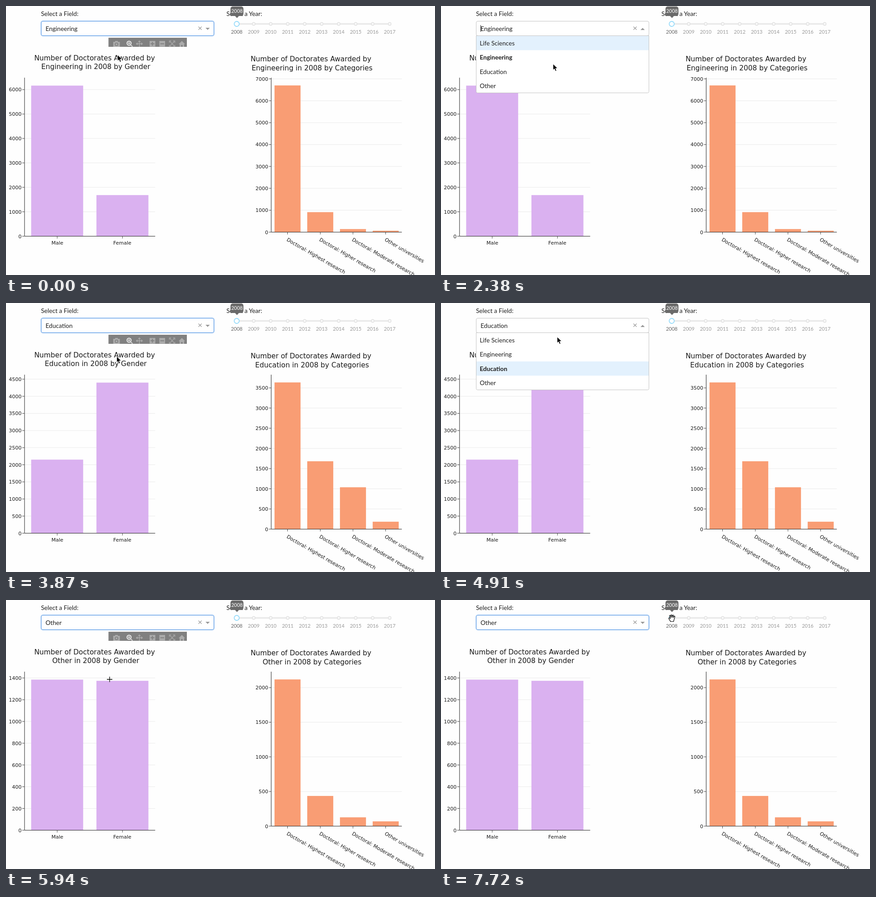
Animation of 944x593 px, one loop 8000 ms. Source, as an HTML page:

```html
<!DOCTYPE html>
<html lang="en">
<head>
<meta charset="utf-8">
<title>Doctorates dashboard</title>
<style>
  html, body { margin: 0; width: 100%; height: 100%; overflow: hidden; background: #fefefe; }
  svg { display: block; width: 944px; height: 593px; }
  text { font-family: Lato, sans-serif; font-size: 13.6px; fill: #1f1f1f; white-space: pre; }
  .plot text { font-family: "DejaVu Sans", Verdana, sans-serif; font-size: 11px; fill: #1a1a1a; }
  .plot .title { font-size: 15.35px; }
</style>
</head>
<body>
<svg id="stage" viewBox="0 0 944 593"></svg>
<script>
const LOOP = 8000, STEP = 148.5;
const stage = document.getElementById('stage');

const fields = ['Life Sciences', 'Engineering', 'Education', 'Other'];
const data = {
  Engineering: { gender: [6163, 1683], genderTick: 1000, types: [6700, 913, 140, 64], typesTick: 1000 },
  Education: { gender: [2150, 4400], genderTick: 500, types: [3635, 1682, 1037, 184], typesTick: 500 },
  Other: { gender: [1385, 1374], genderTick: 200, types: [2118, 436, 127, 69], typesTick: 500 }
};
const typeNames = ['Doctoral: Highest research', 'Doctoral: Higher research',
  'Doctoral: Moderate research', 'Other universities'];

// Pointer path: [step, x, y]
const path = [
  [0, 246, 109], [3, 246, 109], [4, 247, 104], [6, 254, 80], [7, 260, 64], [9, 266, 52],
  [14, 266, 52], [15, 262, 82], [16, 247, 129], [17, 244, 142], [18, 242, 144],
  [23, 242, 144], [24, 242, 138], [26, 244, 119], [28, 250, 88], [29, 254, 64], [31, 260, 47],
  [32, 260, 50], [33, 256, 76], [35, 250, 112], [37, 234, 160], [38, 228, 175],
  [43, 228, 175], [44, 237, 166], [46, 320, 118], [48, 470, 40], [49, 530, 6],
  [50, 538, 30], [51, 518, 40], [52, 508, 40]
];

function pointerAt(k) {
  const i = path.findIndex(p => p[0] >= k);
  if (i <= 0) return i ? path[path.length - 1].slice(1) : path[0].slice(1);
  const [a, b] = [path[i - 1], path[i]];
  const u = (k - a[0]) / (b[0] - a[0]);
  return [a[1] + (b[1] - a[1]) * u, a[2] + (b[2] - a[2]) * u];
}

const rect = (x, y, w, h, fill, more = '') =>
  `<rect x="${x}" y="${y}" width="${w}" height="${h}" fill="${fill}" ${more}/>`;
const draw = (d, stroke, width = 1, fill = 'none', more = '') =>
  `<path d="${d}" stroke="${stroke}" stroke-width="${width}" fill="${fill}" ${more}/>`;
const text = (x, y, s, more = '') => `<text x="${x}" y="${y}" ${more}>${s}</text>`;
const middle = 'text-anchor="middle"';

function barChart({ x, base, values, tick, pitch, barWidth, color, top, title, titleX, titleY }) {
  const scale = top / Math.max(...values);
  const right = x + 287.5;
  let grid = '', labels = '', bars = '';
  for (let v = 0; v * scale <= top / 0.95; v += tick) {
    const y = base - v * scale;
    if (v) grid += draw(`M${x} ${y}H${right}`, '#eaeaea');
    labels += draw(`M${x - 5} ${y}h5`, '#444') + text(x - 6.5, y + 4, v, 'text-anchor="end"');
  }
  values.forEach((v, i) => {
    const center = x + pitch * (i + 0.5);
    bars += rect(center - barWidth / 2, base - v * scale, barWidth, v * scale, color);
    labels += draw(`M${center} ${base}v5`, '#444');
  });
  const heading = title.map((s, i) =>
    text(titleX + (i ? 2.5 : 0), titleY + i * 19.6, s, `class="title" ${middle}`)).join('');
  return grid + bars + draw(`M${x} 158V${base}H${right}`, '#222') + labels + heading;
}

function genderChart(field) {
  const d = data[field];
  return barChart({
    x: 40.8, base: 507.5, values: d.gender, tick: d.genderTick, pitch: 143.6, barWidth: 114.4,
    color: '#dab1f0', top: 332, titleX: 195, titleY: 119.5,
    title: ['Number of Doctorates Awarded by', `${field} in 2008 by Gender`]
  }) + text(113, 526, 'Male', middle) + text(256, 526, 'Female', middle);
}

function typesChart(field) {
  const d = data[field];
  return barChart({
    x: 583.5, base: 498.5, values: d.types, tick: d.typesTick, pitch: 72, barWidth: 57.3,
    color: '#f99d74', top: 323.4, titleX: 671, titleY: 122,
    title: ['Number of Doctorates Awarded by', `${field} in 2008 by Categories`]
  }) + typeNames.map((s, i) =>
    text(0, 0, s, `transform="translate(${616.7 + i * 71.9} 517.3) rotate(30)"`)).join('');
}

function slider() {
  let s = text(485, 21.5, 'Select a Year:') + rect(507, 37.7, 338, 3.6, '#e9e9e9', 'rx="1.8"');
  for (let i = 0; i < 10; i++) {
    const x = 507.7 + i * 37.4;
    s += `<circle cx="${x}" cy="39.5" r="${i ? 3 : 5.5}" fill="#fff" stroke="${i ? '#e4e4e4' : '#96dbfa'}" stroke-width="1.8"/>`
      + text(x, 61, 2008 + i, `${middle} style="font-size:11px;fill:${i ? '#999' : '#666'}"`);
  }
  return s + rect(494, 1, 28.5, 21, '#6a6a6a', 'rx="5"') + draw('M504 22h8.5l-4.2 4.5z', 'none', 0, '#6a6a6a')
    + text(508.2, 15.3, '2008', `${middle} style="font-size:11px;fill:#fff"`);
}

function select(field, open, hover, caret) {
  let s = text(77, 21.5, 'Select a Field:');
  if (!open) s += rect(76.2, 32.2, 382.6, 34.6, 'none', 'rx="4.5" stroke="#e3effc" stroke-width="1.6"');
  s += rect(77.5, 33.5, 380, 32, '#fff', `rx="3.5" stroke="${open ? '#c4c4c4' : '#3a86e0'}"`)
    + text(87, 54.7, field)
    + draw('M423.5 45.5l7 7m0-7l-7 7', '#999', 1.2)
    + draw(open ? 'M439 53h9.4l-4.7-4.7z' : 'M439 48h9.4l-4.7 4.7z', 'none', 0, '#999');
  if (!open) return s;
  if (caret) s += draw('M87.5 42v15', '#222');
  s += draw('M77.5 65.5h380v123q0 3-3 3h-374q-3 0-3-3z', '#c4c4c4', 1, '#fff');
  fields.forEach((name, i) => {
    const y = 66 + i * 31.4;
    if (i === hover) s += rect(78, y, 379, 31.4, '#e3f1fd');
    s += text(85.3, y + 21, name, name === field ? 'font-weight="700"' : '');
  });
  return s;
}

function toolbar(opacity) {
  const gray = '#ababab';
  const zoomBox = (x, sign) => rect(x - 6, 77, 12.5, 12.5, gray) + draw(`M${x - 4} 83.3h8.5${sign}`, '#808080', 2);
  return `<g opacity="${opacity}">` + rect(225.5, 70, 172.5, 20, '#808080')
    + rect(236, 79, 14.5, 11, gray) + rect(240, 77, 6, 3, gray)
    + '<circle cx="243.2" cy="84.5" r="3" fill="none" stroke="#808080" stroke-width="1.6"/>'
    + '<circle cx="270.8" cy="82" r="4.5" fill="none" stroke="#eee" stroke-width="2"/>'
    + draw('M274 85.5l4.5 4M268.5 82h4.6M270.8 79.7v4.6', '#eee', 1.6)
    + draw('M287 83.3h13M293.5 77v13M289.5 81l-2.5 2.3 2.5 2.3M297.5 81l2.5 2.3-2.5 2.3M291.2 79.2l2.3-2.4 2.3 2.4', gray, 1.5)
    + zoomBox(322, 'M322.2 79v8.5') + zoomBox(343.5, '')
    + draw('M359.5 81v-4h4M367.5 77h4v4M359.5 86v3.5h4M371.5 86v3.5h-4M361 78.5l9 9.5M370 78.5l-9 9.5', gray, 1.4)
    + draw('M380 84l7-7 7 7h-2v6h-3.5v-4h-3v4H382v-6z', 'none', 0, gray) + '</g>';
}

const pointers = {
  arrow: () => draw('M-.4-1.2V12.2l3-2.8 2.2 5.2 2.6-1.1-2.2-5H9.6z', '#fff', 1, '#000'),
  beam: () => ['#fff', '#000'].map((c, i) =>
    draw('M-3-7q3 0 3 2.5V4.5q0 2.5-3 2.5M3-7q-3 0-3 2.5V4.5q0 2.5 3 2.5M-1.8 2h3.6', c, i ? 1.3 : 2.6)).join(''),
  cross: () => draw('M-6 0H6M0-6V6', '#fff', 2.4) + draw('M-6 0H6M0-6V6', '#000', 1.3),
  hand: () => draw('M-3 7.5C-4 4.5-8 1-6.8-.3C-5.7-1.5-4 .5-3.4 1L-5.2-4.6C-5.5-6.6-3.6-6.8-3-5L-1.9-1.5'
    + 'L-2.2-6C-2.1-7.9-.2-7.9.1-6L.5-1.8L1.5-6C2-7.6 3.8-7 3.5-5.2L3-1.2L4.8-4C5.8-5.3 7.2-4.4 6.5-2.8'
    + 'L5.3 1.5C5 4 4 5.5 3.8 7.5Z', '#000', 1.2, '#fff', 'stroke-linejoin="round"')
};

function pointer(k, open) {
  const [x, y] = pointerAt(k);
  let kind = 'arrow';
  if (k >= 51) kind = 'hand';
  else if (y > 33 && y < 66 && x < 458) kind = 'beam';
  else if (!open && y > 158) kind = 'cross';
  return `<g transform="translate(${x} ${y})">${pointers[kind]()}</g>`;
}

const fieldAt = (k, first, second) => k < first ? 'Engineering' : k < second ? 'Education' : 'Other';
const fade = (k, from) => Math.max(0, Math.min(1, 1 - (k - from) / 2));

function toolbarOpacity(k) {
  if (k < 21) return fade(k, 6);
  return k < 40 ? fade(k, 27) : fade(k, 45);
}

function render(k) {
  const field = fieldAt(k, 20, 39);
  const openedAt = k >= 13 && k < 20 ? 13 : k >= 32 && k < 39 ? 32 : 0;
  const open = openedAt > 0;
  const row = Math.floor((pointerAt(k - 1)[1] - 66) / 31.4);
  const hover = row < 0 ? fields.indexOf(field) : row;
  const opacity = toolbarOpacity(k);
  stage.innerHTML = `<g class="plot">${genderChart(fieldAt(k, 21, 40))}${typesChart(field)}</g>`
    + (opacity ? toolbar(opacity) : '') + slider()
    + select(field, open, hover, (k - openedAt) % 7 >= 3) + pointer(k, open);
}

let shown = -1;
function tick(now) {
  const k = Math.floor((now % LOOP + 6) / STEP);
  if (k !== shown) render(shown = k);
  requestAnimationFrame(tick);
}
render(0);
requestAnimationFrame(tick);
</script>
</body>
</html>
```
